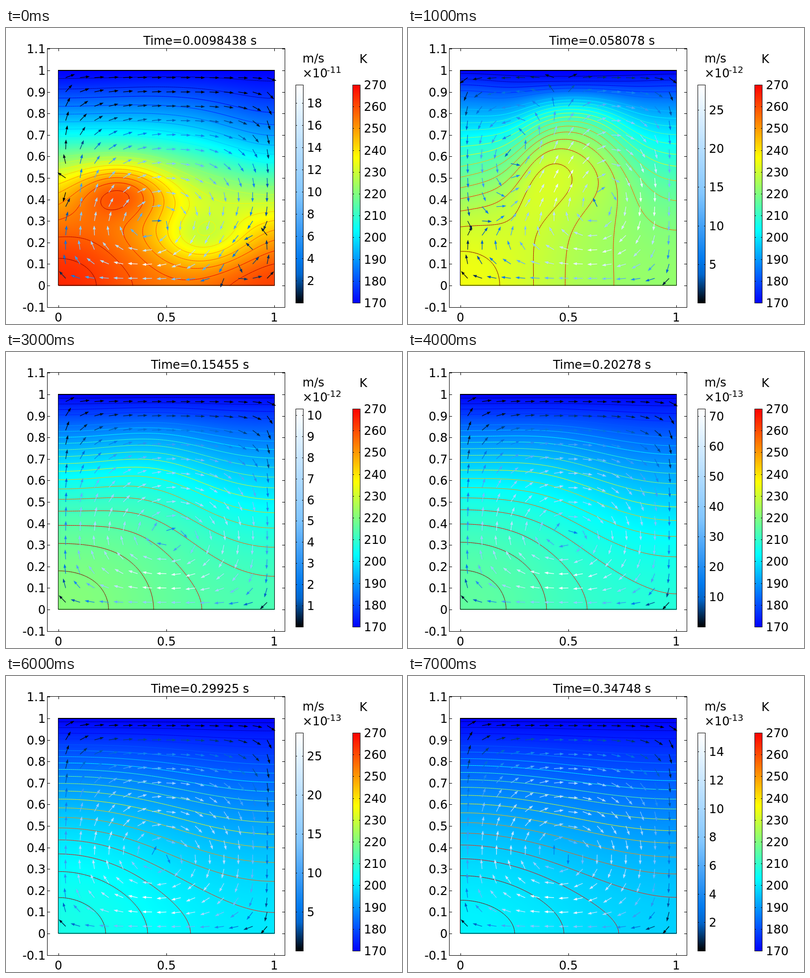
These frames come from a looping animation (800 px wide and 600 px high, 8 s). An HTML page with a canvas:

```html
<!DOCTYPE html>
<html lang="en">
<head>
<meta charset="utf-8">
<title>Convection cell</title>
<style>
html, body { margin: 0; width: 100%; height: 100%; overflow: hidden; background: #fff; }
canvas { display: block; }
</style>
</head>
<body>
<canvas id="stage" width="800" height="600"></canvas>
<script>
const ctx = document.getElementById('stage').getContext('2d');
const LEFT = 106, TOP = 86, BOTTOM = 522, SIZE = 436;
const BAR_TOP = 115, BAR_BOTTOM = 557;
const HOLD = 1000;

// Each triple holds the values at the left wall, the middle and the right wall.
// floor: temperature at the floor in contour steps; bend, power: vertical profile.
// rise: hottest temperature above the lid; top: fastest flow in m/s.
const early = {
  rise: 95, top: 1.964e-10, floor: [20, 18, 19.3], bend: [.05, -.3, -1.44], power: [1.3, 1.1, 1],
  blobs: [[4.8, .29, .45, .23, .14], [-4, .68, .22, .22, .14]],
  centre: [.43, .28], tilt: 2, eddies: [[1, 0, .23, .26], [0, .45, .05, .115]]
};
const plume = {
  rise: 65, top: 2.825e-11, floor: [20, 17.4, 16.2], bend: [.44, 2.9, 1.14], power: [1, 1.8, 1.1],
  drift: .2, centre: [.65, .38], eddies: [[0, 1, .47, .74]]
};
const dome = {
  rise: 55, top: 1.266e-11, floor: [20, 18.3, 17], bend: [.57, 2.1, .88], power: [1, 1.5, 1.05],
  drift: .04, centre: [.61, .344], eddies: [[0, 1, .365, .7]]
};
const roll = {
  rise: 51, top: 1.03e-11, floor: [20, 18.2, 16.9], bend: [.99, 1.3, .44], power: [1.15, 1.13, 1],
  centre: [.514, .337], tilt: .3
};
const slope = {
  rise: 41, top: 5.1e-12, floor: [20, 17.65, 16.3], bend: [1.08, .73, .02], power: [1.15, 1.05, 1],
  centre: [.461, .344], tilt: .5
};
const calm = {
  rise: 32, top: 1.533e-12, floor: [20, 18.4, 17.1], bend: [.35, .2, .01], power: [1, 1, 1],
  centre: [.468, .367], tilt: .5
};
const states = [early, plume, dome, roll, between(roll, slope), slope, between(slope, calm), calm];

function between(a, b) {
  const mean = (v, w) => Array.isArray(v) ? v.map((e, i) => mean(e, w[i])) : (v + w) / 2;
  const mix = Object.fromEntries(Object.keys(a).map(key => [key, mean(a[key], b[key])]));
  mix.top = Math.sqrt(a.top * b.top);
  return mix;
}

const clamp = (v, a, b) => Math.min(b, Math.max(a, v));
const rgb = c => `rgb(${c.map(Math.round).join()})`;
const bell = (...args) => Math.exp(-args.reduce((sum, v) => sum + v * v, 0));

// ---- colour scales ----
function ramp(stops, t) {
  t = clamp(t, 0, 1);
  let i = 1;
  while (i < stops.length - 1 && t > stops[i][0]) i++;
  const [t0, ...a] = stops[i - 1], [t1, ...b] = stops[i];
  return a.map((v, j) => v + (b[j] - v) * (t - t0) / (t1 - t0));
}
const heat = t => ramp([[0, 0, 0, 255], [1 / 3, 0, 255, 255], [2 / 3, 255, 255, 0], [1, 255, 0, 0]], t);
const flow = t => ramp([[0, 0, 0, 0], [.13, 0, 102, 205], [.2, 0, 122, 238],
  [.5, 130, 198, 255], [1, 255, 255, 255]], t);
const jet = t => [3, 2, 1].map(c => 255 * clamp(1.5 - Math.abs(4 * t - c), 0, 1));

// ---- temperature in contour steps: 0 at the lid, 20 in the hottest corner ----
// Cosines keep the isotherms square to the insulated walls and floor.
function across([left, mid, right], x) {
  const mean = (left + right) / 2;
  return (mean + mid) / 2 + (left - right) / 2 * Math.cos(Math.PI * x) +
    (mean - mid) / 2 * Math.cos(2 * Math.PI * x);
}

function temperature({ floor, bend, power, drift = 0, blobs = [] }, x, y) {
  const depth = Math.max(0, Math.cos(Math.PI * y / 2)) ** across(power, x);
  const q = Math.sinh(across(bend, x)) || 1e-6;
  const shifted = x - drift * bell((y - .52) / .2);
  const u = across(floor, shifted) * Math.expm1(-q * depth) / Math.expm1(-q);
  return blobs.reduce((sum, [amp, bx, by, rx, ry]) =>
    sum + amp * bell((x - bx) / rx, (y - by) / ry) * (1 - y ** 8), u);
}

function sampleField(state, step) {
  const n = SIZE / step + 1;
  const values = Float32Array.from({ length: n * n }, (_, i) =>
    temperature(state, i % n / (n - 1), 1 - Math.floor(i / n) / (n - 1)));
  return { n, values };
}

// ---- velocity: stream function with its centre at (cx, cy) ----
// Each eddy [x, y, rx, ry] is an ellipse in which the flow turns the other way.
function makeFlow({ centre: [cx, cy], tilt = 0, eddies = [] }) {
  const h = 1e-4;
  const turn = (x, y) => eddies.reduce((g, [ex, ey, rx, ry]) => {
    const q = ((x - ex) / rx) ** 2 + ((y - ey) / ry) ** 2;
    return g * (q - 1) / (q + 4);
  }, 1);
  const grade = (dx, dy) => (turn(cx + dx, cy + dy) / turn(cx - dx, cy - dy) - 1) / (2 * h);
  const px = (1 - cx) * (2 / cx + grade(h, 0)), py = (1 - cy) * (2 / cy + grade(0, h));
  const psi = (x, y) => x * x * (1 - x) ** px * y * y * (1 - y) ** py *
    Math.exp(tilt * (x - cx) * (y - cy)) * turn(x, y);
  return (x, y) => [psi(x, y - h) - psi(x, y + h), psi(x + h, y) - psi(x - h, y)];
}

// ---- drawing ----
function segment(g, x1, y1, x2, y2) {
  g.beginPath();
  g.moveTo(x1, y1);
  g.lineTo(x2, y2);
  g.stroke();
}

function text(g, str, x, y, align = 'left', size = 24) {
  g.font = `${size}px "DejaVu Sans", sans-serif`;
  g.textAlign = align;
  g.fillStyle = '#000';
  g.fillText(str, x, y);
}

function drawSurface(g, state) {
  const { n, values } = sampleField(state, 1);
  const img = g.createImageData(n, n);
  const scale = Array.from({ length: 1001 }, (_, i) => heat(i / 1000));
  values.forEach((u, i) => {
    const c = scale[Math.round(clamp(u / 20, 0, 1) * state.rise * 10)];
    img.data.set([c[0], c[1], c[2], 255], i * 4);
  });
  g.putImageData(img, LEFT, TOP);
}

function drawContours(g, state) {
  const step = 4, { n, values } = sampleField(state, step);
  g.lineWidth = 1;
  for (let k = 0; k < 20; k++) {
    const level = k + .5;
    g.strokeStyle = rgb(jet(k / 19));
    g.beginPath();
    for (let j = 0; j < n - 1; j++) for (let i = 0; i < n - 1; i++) {
      const corners = [[i, j], [i + 1, j], [i + 1, j + 1], [i, j + 1]];
      const hits = [];
      corners.forEach(([ax, ay], e) => {
        const [bx, by] = corners[(e + 1) % 4];
        const a = values[ay * n + ax] - level, b = values[by * n + bx] - level;
        if (a < 0 === b < 0) return;
        const f = a / (a - b);
        hits.push([LEFT + step * (ax + f * (bx - ax)) + .5, TOP + step * (ay + f * (by - ay)) + .5]);
      });
      for (let h = 0; h + 1 < hits.length; h += 2) {
        g.moveTo(...hits[h]);
        g.lineTo(...hits[h + 1]);
      }
    }
    g.stroke();
  }
}

function drawArrow(g, x, y, angle, colour) {
  g.save();
  g.translate(x, y);
  g.rotate(angle);
  g.strokeStyle = g.fillStyle = colour;
  g.lineWidth = 1.3;
  segment(g, 0, 0, 14, 0);
  g.beginPath();
  g.moveTo(20, 0);
  g.lineTo(12, -2.8);
  g.lineTo(12, 2.8);
  g.fill();
  g.restore();
}

function drawArrows(g, state) {
  const velocity = makeFlow(state);
  let peak = 0;
  for (let i = 1; i < 60; i++) for (let j = 1; j < 60; j++)
    peak = Math.max(peak, Math.hypot(...velocity(i / 60, j / 60)));
  for (let i = 0; i < 15; i++) for (let j = 0; j < 15; j++) {
    const x = (i + .5) / 15, y = (j + .5) / 15, [u, v] = velocity(x, y);
    const colour = rgb(flow((Math.hypot(u, v) / peak) ** .8));
    drawArrow(g, LEFT + SIZE * x, BOTTOM - SIZE * y, Math.atan2(-v, u), colour);
  }
}

function drawAxes(g) {
  g.strokeStyle = '#000';
  g.lineWidth = 1;
  g.strokeRect(83.5, 41.5, 480, 525);
  g.strokeRect(LEFT - .5, TOP - .5, SIZE + 1, SIZE);
  segment(g, LEFT, TOP + .5, LEFT + SIZE, TOP + .5);
  for (let i = -1; i <= 11; i++) {
    const y = Math.round(BOTTOM - SIZE * i / 10);
    segment(g, 84, y + .5, 89, y + .5);
    segment(g, 558, y + .5, 563, y + .5);
    text(g, String(i / 10), 80, y + 9, 'right');
  }
  for (const v of [0, .5, 1]) {
    const x = LEFT + SIZE * v;
    segment(g, x + .5, 42, x + .5, 47);
    segment(g, x + .5, 562, x + .5, 567);
    text(g, String(v), x, 595, 'center');
  }
}

function drawBar(g, x, scale, from, to, step) {
  const height = BAR_BOTTOM - BAR_TOP;
  for (let y = BAR_TOP; y < BAR_BOTTOM; y++) {
    g.fillStyle = rgb(scale((BAR_BOTTOM - y) / height));
    g.fillRect(x, y, 16, 1);
  }
  g.strokeStyle = '#000';
  g.lineWidth = 1;
  g.strokeRect(x + .5, BAR_TOP + .5, 15, height);
  for (let v = from || step; v <= to; v += step) {
    const y = Math.round(BAR_BOTTOM - (v - from) / (to - from) * height);
    segment(g, x, y + .5, x + 3, y + .5);
    segment(g, x + 13, y + .5, x + 16, y + .5);
    text(g, String(v), x + 23, y + 9);
  }
}

function render(state, index) {
  const canvas = document.createElement('canvas');
  canvas.width = 800;
  canvas.height = 600;
  const g = canvas.getContext('2d');
  g.fillStyle = '#fff';
  g.fillRect(0, 0, 800, 600);
  drawSurface(g, state);
  drawContours(g, state);
  drawAxes(g);
  drawArrows(g, state);

  const exponent = Math.floor(Math.log10(state.top)) - 1;
  const top = state.top / 10 ** exponent;
  drawBar(g, 585, flow, 0, top, [1, 2, 5, 10].find(s => top / s <= 10.5));
  drawBar(g, 700, heat, 170, 270, 10);
  text(g, `Time=${(.0098438 + .0482343 * index).toPrecision(5)} s`, 392, 34, 'center');
  text(g, 'm/s', 599, 70);
  text(g, '×10', 599, 100);
  text(g, String(exponent), 648, 91, 'left', 18);
  text(g, 'K', 714, 71);
  return canvas;
}

const pictures = states.map(render);
const start = performance.now();
let shown = -1;
function tick() {
  const index = Math.floor((performance.now() - start) / HOLD) % pictures.length;
  if (index !== shown) ctx.drawImage(pictures[shown = index], 0, 0);
  requestAnimationFrame(tick);
}
tick();
</script>
</body>
</html>
```
